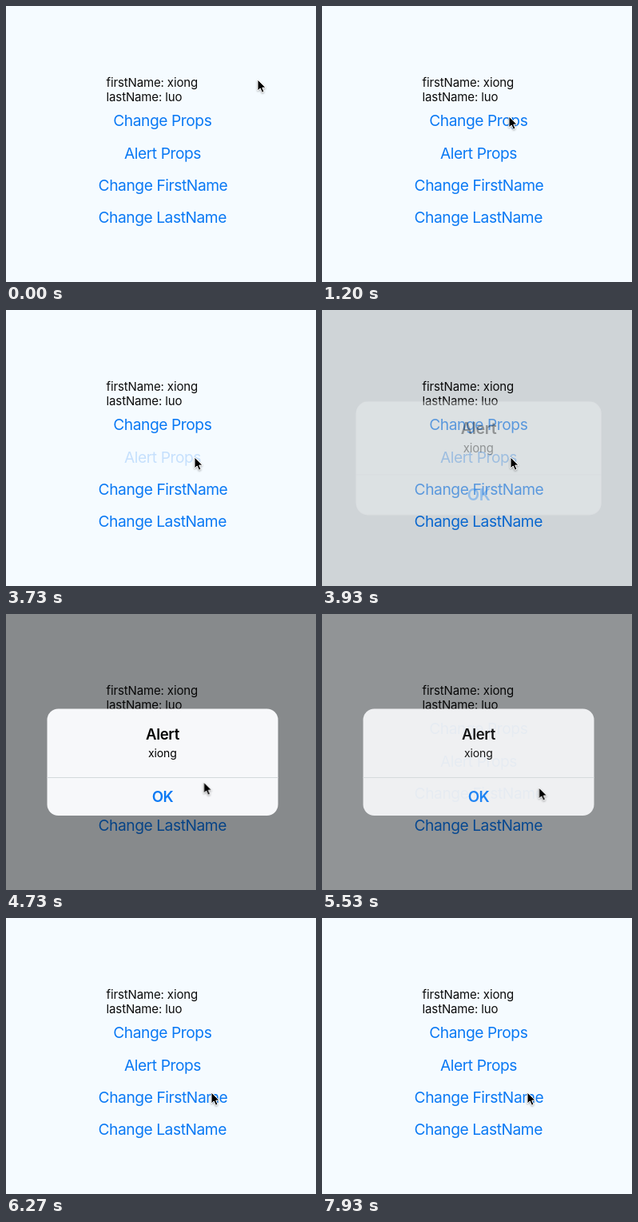
These frames come from a looping animation (388 by 345 pixels, 8 s). An HTML page:

```html
<!DOCTYPE html>
<html lang="en">
<head>
<meta charset="utf-8">
<title>Props demo</title>
<style>
html, body { margin: 0; width: 100%; height: 100%; overflow: hidden; background: #f5fbff; }
svg { display: block; width: 388px; height: 345px; font-family: Inter, "Liberation Sans", sans-serif; }
.info { font-size: 15px; letter-spacing: -.14px; fill: #0c0c0c; }
.button { font-size: 19.2px; letter-spacing: -.43px; fill: #0a79f4; text-anchor: middle; }
.alert { text-anchor: middle; transform-origin: 196px 185px; }
.title { font-size: 18.5px; font-weight: 600; letter-spacing: -.3px; }
.message { font-size: 14px; letter-spacing: -.1px; }
.ok { font-size: 18.7px; font-weight: 600; letter-spacing: -.4px; fill: #0a79f4; }

.press-change, .press-alert, .press-first, .dim, .alert, .panel, .cursor {
  animation: 8s linear infinite;
}
.press-change { animation-name: press-change; }
.press-alert { animation-name: press-alert; }
.press-first { animation-name: press-first; }
.dim, .content { animation: fade 8s linear infinite; }
.panel { animation-name: fade-panel; }
.alert { animation-name: pop; }
.cursor { animation-name: move; filter: drop-shadow(0 1px 1px #0005); }

@keyframes press-change {
  0%, 15.5% { opacity: 1; }
  17%, 17.5% { opacity: .2; }
  20.2%, 100% { opacity: 1; }
}
@keyframes press-alert {
  0%, 40.3% { opacity: 1; }
  43%, 48% { opacity: .2; }
  51.2%, 100% { opacity: 1; }
}
@keyframes press-first {
  0%, 84.6% { opacity: 1; }
  86.8%, 87.6% { opacity: .2; }
  91%, 100% { opacity: 1; }
}
@keyframes fade {
  0%, 48% { opacity: 0; animation-timing-function: ease-out; }
  53%, 68.1% { opacity: 1; animation-timing-function: ease-in-out; }
  73.1%, 100% { opacity: 0; }
}
/* the panel lags slightly behind its text when leaving */
@keyframes fade-panel {
  0%, 48% { opacity: 0; animation-timing-function: ease-out; }
  53%, 68.1% { opacity: 1; animation-timing-function: ease-in-out; }
  73.7%, 100% { opacity: 0; }
}
@keyframes pop {
  0%, 48% { transform: scale(1.18); animation-timing-function: cubic-bezier(.2, .8, .3, 1); }
  53.4%, 100% { transform: none; }
}
@keyframes move {
  0%, .6% { transform: translate(315px, 92px); animation-timing-function: ease-in-out; }
  9.2%, 10.6% { transform: translate(240px, 125px); animation-timing-function: ease-out; }
  14%, 29% { transform: translate(234px, 138px); animation-timing-function: ease-in-out; }
  37.5%, 56.3% { transform: translate(236px, 184px); animation-timing-function: ease-in; }
  59.1% { transform: translate(247px, 210px); animation-timing-function: ease-out; }
  62.5%, 72% { transform: translate(271.5px, 217px); animation-timing-function: ease-in-out; }
  78%, 100% { transform: translate(257px, 218px); }
}
</style>
</head>
<body>
<svg viewBox="0 0 388 345">
  <rect width="388" height="345" fill="#f5fbff"/>
  <g class="info">
    <text x="125.6" y="101">firstName: xiong</text>
    <text x="125.6" y="119">lastName: luo</text>
  </g>
  <g class="button">
    <text class="press-change" x="195.8" y="150.2">Change Props</text>
    <text class="press-alert" x="196" y="190.8">Alert Props</text>
    <text class="press-first" x="196.5" y="230.8">Change FirstName</text>
    <text x="195.7" y="271.2">Change LastName</text>
  </g>

  <rect class="dim" width="388" height="345" fill="#000" fill-opacity=".45"/>
  <g class="alert">
    <rect class="panel" x="51.5" y="118.5" width="289" height="133.5" rx="14" fill="#f7f8fa"/>
    <g class="content">
      <path d="M51.5 204.5h289" stroke="#d4d9dc"/>
      <text class="title" x="196" y="157.2">Alert</text>
      <text class="message" x="195.8" y="178.5">xiong</text>
      <text class="ok" x="196" y="235.3">OK</text>
    </g>
  </g>

  <g class="cursor">
    <path d="M0 0V14L3.2 11 5.5 16.2 8 15.1 5.8 10.1H10Z" stroke="#fff" stroke-width="1" stroke-linejoin="round"/>
  </g>
</svg>
</body>
</html>
```
